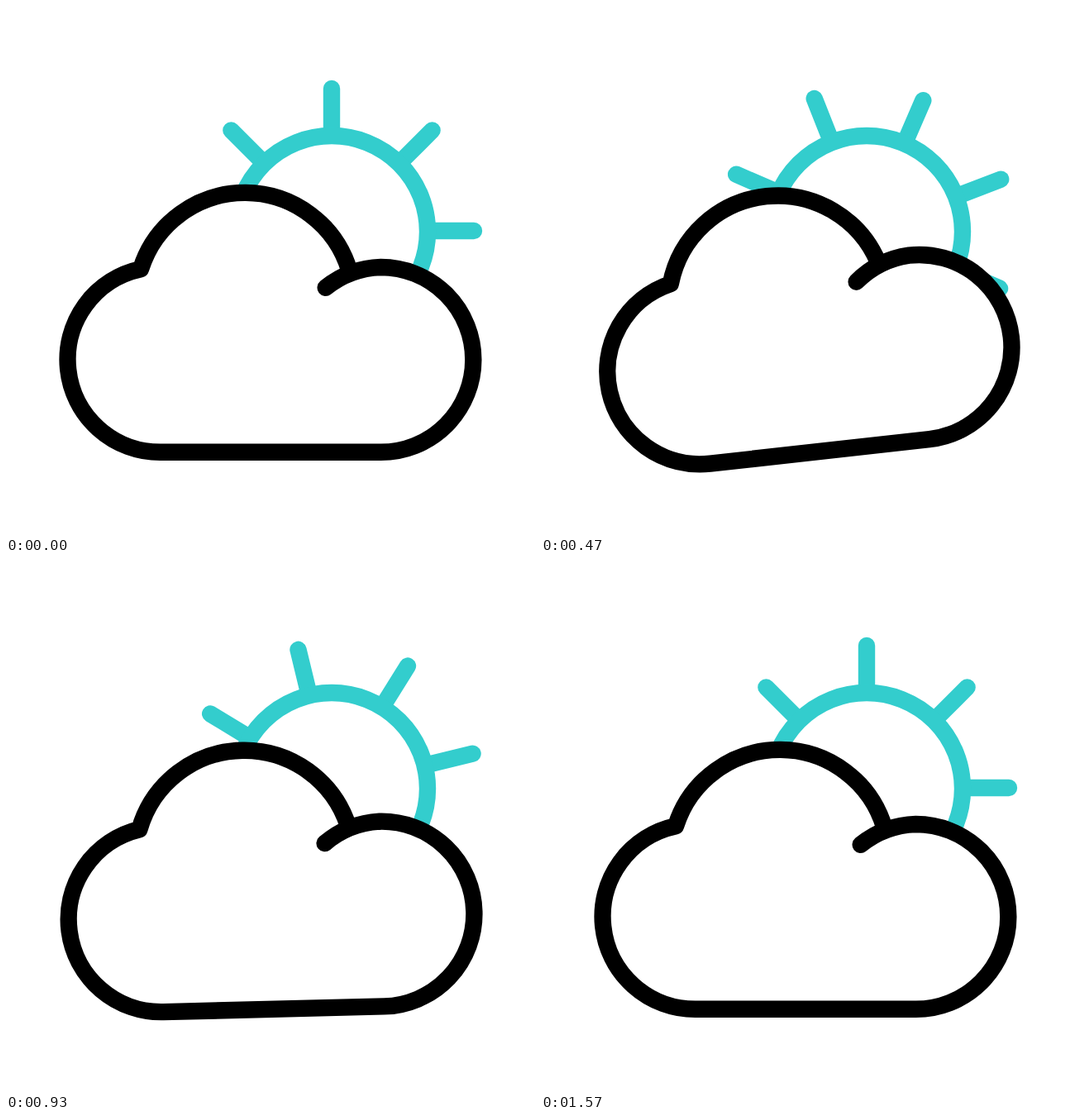
An HTML page that plays this animation: 640x640 px, repeating every 1670 ms.

```html
<!DOCTYPE html>
<html>
<head>
<meta charset="utf-8">
<style>
  html, body { margin: 0; height: 100%; overflow: hidden; background: #fff; }
  svg { display: block; width: 100vw; height: 100vh; }
  g { fill: #fff; stroke-width: 20.4; stroke-linecap: round; stroke-linejoin: round; }
</style>
</head>
<body>
<svg viewBox="0 0 640 640">
  <g stroke="#33cdcd">
    <path id="rays"/>
    <circle cx="394" cy="273" r="116"/>
  </g>
  <g id="cloud" stroke="#000">
    <path d="M386.7 340.8A112 112 0 0 1 453.5 316A111.9 111.9 0 0 1 453.5 539.8H186.5A112 112 0 0 1 163 318.3A132 132 0 0 1 415.5 320.5"/>
  </g>
</svg>
<script>
const LOOP = 1670, STEP = 100 / 3, LAST = 47;
const rays = document.getElementById('rays');
const cloud = document.getElementById('cloud');

// Eight rays; the lower half of the ring of tips is slightly taller.
let outline = '';
for (let i = 0; i < 8; i++) {
  const turn = i * Math.PI / 4;
  const x = 172 * Math.sin(turn), y = Math.max(-172 * Math.cos(turn), -175.5 * Math.cos(turn));
  outline += `M${x * .7} ${y * .7}L${x} ${y}`;
}
rays.setAttribute('d', outline);

// Sine ease from 0 to 1 between two steps.
function ease(step, from, to) {
  const p = Math.min(1, Math.max(0, (step - from) / (to - from)));
  return (1 - Math.cos(Math.PI * p)) / 2;
}

// The sun turns back and returns.
const sunAngle = step => -107 * (ease(step, 1.5, 23.1) - ease(step, 25.6, 46.7));

// The cloud rocks through shrinking swings: [step, degrees].
const swings = [[0, 0], [8.4, 15], [14.8, -7.2], [22.5, 5], [29.3, -2.05], [38, 0]];
const cloudAngle = step => swings.slice(1).reduce((sum, [to, angle], i) =>
  sum + (angle - swings[i][1]) * ease(step, swings[i][0], to), 0);

function draw(now) {
  const step = Math.min(LAST, Math.floor((now % LOOP + 4) / STEP));
  rays.setAttribute('transform', `translate(394 272) rotate(${sunAngle(step)})`);
  cloud.setAttribute('transform', `rotate(${cloudAngle(step)} 320 383)`);
}

const start = performance.now();
function tick() {
  draw(performance.now() - start);
  requestAnimationFrame(tick);
}
tick();
</script>
</body>
</html>
```
